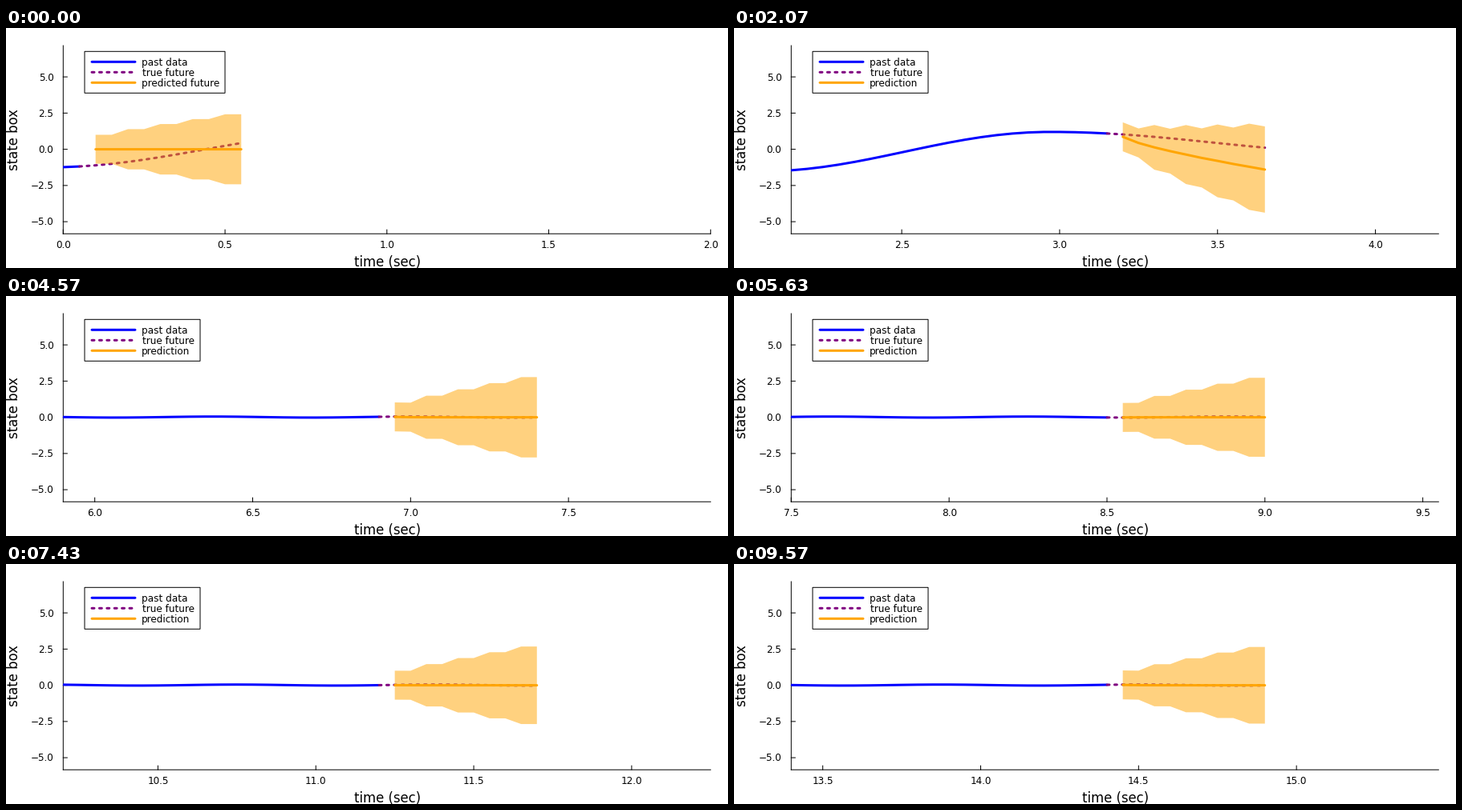
These frames come from a looping animation (900x300 px, 9.61 s). A matplotlib script:

```python
import numpy as np
import matplotlib.pyplot as plt
from matplotlib.animation import FuncAnimation
from matplotlib.patches import Polygon, Rectangle

W, H, DPI = 900, 300, 100
PX = 72 / DPI                      # points per pixel
TICKS, INTERVAL = 310, 31          # one loop is 9610 ms
STEPS, FPS = 288, 30
DT, AHEAD = 0.05, 10
LEFT, RIGHT, TOP, BOTTOM = 71.3, 878.3, 22, 257.2
ZERO, UNIT = 151.6, 18.1           # pixel row of zero, pixels per unit

plt.rcParams["font.family"] = "DejaVu Sans"


def turning_points():
    """The state's extremes: a damped swing, then a small ripple."""
    points = [(-.05, -1.25), (.93, 1.25), (2.05, -1.53), (2.97, 1.2),
              (4.0, -.27), (4.65, .32), (5.25, -.12)]
    points += [(5.75 + 0.3125 * k, -.02 if k % 2 else .05) for k in range(32)]
    return np.array(points).T


def state(x):
    t, y = turning_points()
    i = np.searchsorted(t, x, side="right") - 1
    s = (x - t[i]) / (t[i + 1] - t[i])
    return y[i] + (y[i + 1] - y[i]) * (1 - np.cos(np.pi * s)) / 2


TIME = DT * np.arange(STEPS + AHEAD + 2)
STATE = state(TIME)


def forecast(n):
    """Mean and half width of the band for the next steps."""
    k = np.arange(AHEAD)
    y = STATE[n + 1]
    rough = min(n / 4, 6, np.exp((35 - n) / 6))
    settled = np.clip((n - 62) / 13, 0, 1)

    wave = np.cos(2 * np.pi * (k - 1) / 2.35 + 0.9 * (n - 35)) * np.exp(-k / 15)
    swing = y * (0.8 - 2.1 * (k / 9) ** 0.75)
    rest = 0.8 * y * np.exp(-1.2 * k)
    trend = (1 - settled) * swing + settled * rest
    calm = 1 - min(rough, 1) if n else 0
    mean = calm * trend + rough * (0.3 * y + 0.65 * wave)

    spread = 1.6 + 0.72 * np.exp(-n / 90) if n else 1.4
    half = 1 + spread * (k // 2 / 4) ** 0.93 + 0.002 * k
    return mean, half


def row(v):
    return ZERO - UNIT * np.asarray(v)


fig = plt.figure(figsize=(W / DPI, H / DPI), dpi=DPI, facecolor="white")
ax = fig.add_axes([0, 0, 1, 1])
ax.set_xlim(0, W)
ax.set_ylim(H, 0)
ax.axis("off")


def line(x, y, color, width, **kw):
    return ax.plot(x, y, color=color, lw=width * PX, snap=False, **kw)[0]


def label(x, y, s, size=12, **kw):
    return ax.text(x, y, s, fontsize=size * PX, color="black", va="baseline",
                   **kw)


# Axes
AXIS = dict(color="black", width=1, zorder=1)
line([LEFT, LEFT], [TOP, BOTTOM], **AXIS)
line([LEFT, RIGHT], [BOTTOM, BOTTOM], **AXIS)
for v in np.arange(-5, 6, 2.5):
    y = row(v)
    line([LEFT, LEFT + 5], [y, y], **AXIS)
    label(59.4, y + 4.4, f"{v:.1f}".replace("-", "\u2212"), ha="right")
label(475.6, 298, "time (sec)", 16.5, ha="center")
label(14.6, 139.8, "state box", 16.5, ha="center", rotation=90,
      rotation_mode="anchor")
marks = [(line([], [], **AXIS), label(0, 275.4, "", ha="center"))
         for _ in range(5)]

# Data
DASH = dict(linestyle=(0, (1.0, 2.13)), dash_capstyle="round")
SOLID = dict(solid_capstyle="round", solid_joinstyle="round")
past = line([], [], "blue", 3, zorder=2, **SOLID)
future = line([], [], "purple", 3, zorder=3, **DASH)
band = ax.add_patch(Polygon([(0, 0), (1, 0), (1, 1)], fc="orange", alpha=0.5,
                            lw=0, zorder=4))
guess = line([], [], "orange", 3, zorder=5, **SOLID)
window = Rectangle((LEFT, TOP), RIGHT - LEFT, BOTTOM - TOP,
                   transform=ax.transData)
for art in (past, future, band, guess):
    art.set_clip_path(window)

# Legend
box = ax.add_patch(Rectangle((98, 29.3), 144, 52, fc="white", ec="black",
                             lw=PX, snap=False, zorder=6))
names = []
for i, (color, style, x, name) in enumerate((
        ("blue", SOLID, 168.6, "past data"),
        ("purple", DASH, 169.6, "true future"),
        ("orange", SOLID, 168.6, "prediction"))):
    y = 42.3 + 13 * i
    line([107, 161], [y, y], color, 3, zorder=7, **style)
    names.append(label(x, y + 4.4, name, zorder=7))


def draw(tick):
    n = min(STEPS - 1, int((tick + 1) * INTERVAL * FPS / 1000))
    now = TIME[n + 1]
    lo, hi = max(0, now - 1), max(2, now + 1.05)

    def col(t):
        return LEFT + (np.asarray(t) - lo) / (hi - lo) * (RIGHT - LEFT)

    first = int(np.ceil(lo * 2 - 1e-6))
    for i, (mark, text) in enumerate(marks):
        t = (first + i) / 2
        x = col(t)
        mark.set_data([x, x], [BOTTOM, BOTTOM - 5])
        text.set_x(x)
        text.set_text(f"{t:.1f}")
        for art in (mark, text):
            art.set_visible(t <= hi + 1e-6)

    seen = slice(max(0, n - 19), n + 2)
    coming = slice(n + 1, n + 2 + AHEAD)
    past.set_data(col(TIME[seen]), row(STATE[seen]))
    future.set_data(col(TIME[coming]), row(STATE[coming]))

    mean, half = forecast(n)
    x = col(TIME[n + 2:n + 2 + AHEAD])
    guess.set_data(x, row(mean))
    edge = np.r_[row(mean + half), row(mean - half)[::-1]]
    band.set_xy(np.c_[np.r_[x, x[::-1]], edge])

    box.set_width(144 if n else 175)
    names[-1].set_text("prediction" if n else "predicted future")
    return []


anim = FuncAnimation(fig, draw, frames=TICKS, interval=INTERVAL,
                     init_func=lambda: draw(0), repeat=True, repeat_delay=0,
                     blit=False)
plt.show()
```
